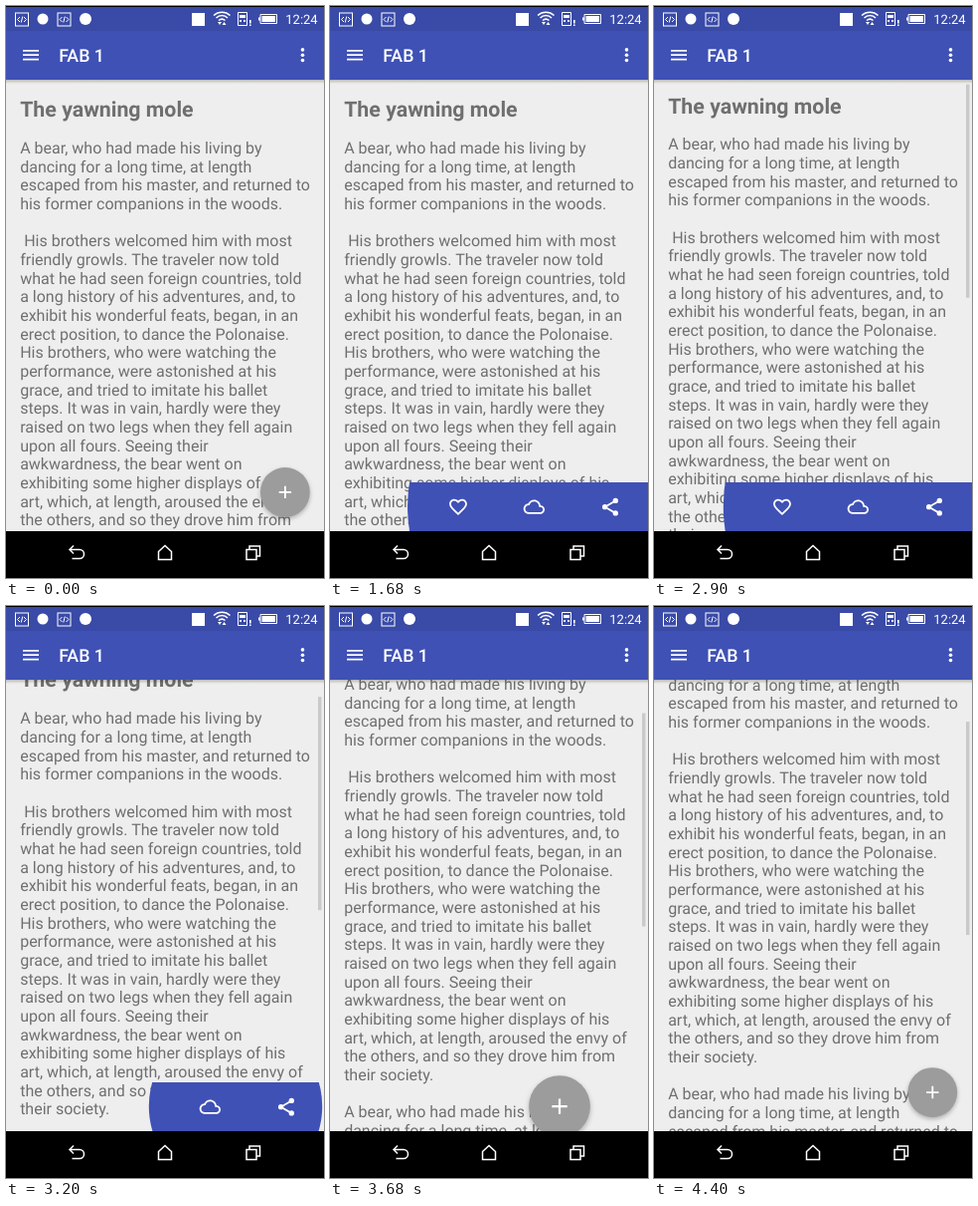
These frames come from a looping animation (320 px wide and 574 px high, 4.46 s). An HTML page:

```html
<!DOCTYPE html>
<html lang="en">
<meta charset="utf-8">
<title>FAB 1</title>
<style>
  html, body { margin: 0; height: 100%; overflow: hidden; background: #000; }
  svg { display: block; width: 100vw; height: 100vh; font-family: Roboto, sans-serif; text-rendering: geometricPrecision; }
  text { white-space: pre; }
  .line { fill: none; stroke: #fff; stroke-width: 1.5; }
  .thin { stroke-width: 1; }
  .bold { stroke-width: 1.8; }
  #fab { filter: drop-shadow(0 2px 2px #0004); }
</style>
<svg viewBox="0 0 320 574">
  <defs>
    <clipPath id="page"><rect y="74" width="320" height="453"/></clipPath>
    <clipPath id="reveal"><circle id="hole" cx="231" cy="502"/></clipPath>
    <linearGradient id="shade" x2="0" y2="1">
      <stop stop-opacity=".22"/><stop offset="1" stop-opacity="0"/>
    </linearGradient>
    <g id="code" class="line thin">
      <rect x="-6.5" y="-6.5" width="13" height="13"/>
      <path d="M-2-2.5-4.5 0-2 2.5M2-2.5 4.5 0 2 2.5M.7-3-.7 3"/>
    </g>
  </defs>

  <g clip-path="url(#page)">
    <rect y="74" width="320" height="453" fill="#eee"/>
    <g id="story" fill="#6f6f6f" font-size="16">
      <text x="14.2" y="111.2" font-size="21.33" font-weight="700">The yawning mole</text>
    </g>
    <rect id="thumb" x="314" width="3.5" height="214" fill="#c9c9c9"/>
    <rect y="74" width="320" height="4" fill="url(#shade)"/>
    <g id="bar" clip-path="url(#reveal)" fill="#fff">
      <rect y="478" width="320" height="49" fill="#3f51b5"/>
      <path transform="translate(118.3 492) scale(.889)" d="M16.5 3c-1.74 0-3.41.81-4.5 2.09C10.91 3.81 9.24 3 7.5 3 4.42 3 2 5.42 2 8.5c0 3.78 3.4 6.86 8.55 11.54L12 21.35l1.45-1.32C18.6 15.36 22 12.28 22 8.5 22 5.42 19.58 3 16.5 3zm-4.4 15.55l-.1.1-.1-.1C7.14 14.24 4 11.39 4 8.5 4 6.5 5.5 5 7.5 5c1.54 0 3.04.99 3.57 2.36h1.87C13.46 5.99 14.96 5 16.5 5c2 0 3.5 1.5 3.5 3.5 0 2.89-3.14 5.74-7.9 10.05z"/>
      <path transform="translate(194.7 492) scale(.889)" d="M19.35 10.04C18.67 6.59 15.64 4 12 4 9.11 4 6.6 5.64 5.35 8.04 2.34 8.36 0 10.91 0 14c0 3.31 2.69 6 6 6h13c2.76 0 5-2.24 5-5 0-2.64-2.05-4.78-4.65-4.96zM19 18H6c-2.21 0-4-1.79-4-4s1.79-4 4-4h.71C7.37 7.69 9.48 6 12 6c3.04 0 5.5 2.46 5.5 5.5v.5H19c1.66 0 3 1.34 3 3s-1.34 3-3 3z"/>
      <g transform="translate(271.3 492) scale(.889)">
        <path class="line" style="stroke-width:2" d="M18 5 6 12 18 19"/>
        <circle cx="18" cy="5" r="3"/><circle cx="6" cy="12" r="3"/><circle cx="18" cy="19" r="3"/>
      </g>
    </g>
    <g id="fab">
      <circle r="24.9" fill="#9c9c9c"/>
      <path class="line bold" d="M-6.2 0H6.2M0-6.2V6.2"/>
    </g>
  </g>

  <!-- status bar -->
  <rect y="1" width="320" height="24" fill="#394aa7"/>
  <use href="#code" x="16" y="13.5"/>
  <use href="#code" x="58.5" y="13.5"/>
  <g fill="#fff">
    <circle cx="37" cy="13" r="5.5"/>
    <circle cx="80" cy="13" r="6"/>
    <rect x="187" y="7" width="13" height="13"/>
    <path d="M235 9h6v3h-6zM235 14h2v2h-2zM239 14h2v2h-2zM245 14h1.6v3.5H245zM245 18.5h1.6V20H245z"/>
    <path d="M254 11.5h2v3h-2zM257.5 10H271v6H257.5z"/>
    <path d="M213 16l2 3 2-3zM217.5 19l2-3 2 3z"/>
    <text x="281.3" y="18" font-size="13">12:24</text>
  </g>
  <path class="line" d="M209 9.5a12 12 0 0 1 16.5 0M211.5 12a8 8 0 0 1 11.500 0M214 14.5a5 5 0 0 1 6.5 0"/>
  <path class="line thin" d="M233.500 6.500H242.500V19.500H233.500ZM256 8.500H272.500V17.500H256Z"/>

  <!-- app bar -->
  <rect y="25" width="320" height="49" fill="#3f51b5"/>
  <path class="line bold" d="M17 44.800H33M17 49.200H33M17 53.600H33"/>
  <g fill="#fff">
    <text x="53.200" y="56" font-size="17.8" font-weight="500">FAB 1</text>
    <circle cx="298.500" cy="43.900" r="1.8"/><circle cx="298.500" cy="49.200" r="1.8"/><circle cx="298.500" cy="54.500" r="1.8"/>
  </g>

  <!-- navigation bar -->
  <rect y="527" width="320" height="47"/>
  <path class="line" d="M64.500 545.500H74A4.500 4.500 0 0 1 74 554.500H66.500M68 541.500 64 545.500 68 549.500"/>
  <path class="line" d="M153.500 547.500 160 541.500 166.500 547.500V555.500H153.500Z"/>
  <path class="line" d="M242 545.500H252V555.500H242ZM245 545V542H255.500V552H252.500"/>
</svg>
<script>
const intro = `A bear, who had made his living by
dancing for a long time, at length
escaped from his master, and returned to
his former companions in the woods.`;
const lines = `${intro}

 His brothers welcomed him with most
friendly growls. The traveler now told
what he had seen foreign countries, told
a long history of his adventures, and, to
exhibit his wonderful feats, began, in an
erect position, to dance the Polonaise.
His brothers, who were watching the
performance, were astonished at his
grace, and tried to imitate his ballet
steps. It was in vain, hardly were they
raised on two legs when they fell again
upon all fours. Seeing their
awkwardness, the bear went on
exhibiting some higher displays of his
art, which, at length, aroused the envy of
the others, and so they drove him from
their society.

${intro}`.split('\n');

const $ = id => document.getElementById(id);
lines.forEach((line, i) => {
  const text = document.createElementNS('http://www.w3.org/2000/svg', 'text');
  text.setAttribute('x', 14.2);
  text.setAttribute('y', 148 + i * 18.667);
  text.textContent = line;
  $('story').append(text);
});

const LOOP = 4460, STEP = 60, HOLD = 2100, CLOSE = 2900;
const part = (t, from, to) => Math.min(1, Math.max(0, (t - from) / (to - from)));
const ease = (t, from, to) => (1 - Math.cos(Math.PI * part(t, from, to))) / 2;

// Time advances in fixed steps and pauses while the bar is open.
function stepTime(t) {
  const base = t < CLOSE ? 0 : CLOSE;
  const stepped = base + Math.floor((t - base) / STEP) * STEP;
  return base ? stepped : Math.min(HOLD, stepped);
}

function draw(t) {
  const closing = t >= CLOSE;
  const scroll = closing ? 82 * Math.sin(Math.PI / 2 * part(t, 2860, 4300)) : 0;
  // The invisible rotation keeps baselines from snapping to whole pixels.
  $('story').setAttribute('transform', `translate(0 ${-scroll}) rotate(.005)`);
  $('thumb').setAttribute('y', 77 + scroll * .477);
  $('thumb').style.display = closing ? '' : 'none';

  const barShown = t >= 1110 && t < 3666;
  $('bar').style.display = barShown ? '' : 'none';
  $('fab').style.display = barShown ? 'none' : '';
  const open = closing ? 1 - ease(t, 2237, 3666) : ease(t, 1110, 2220);
  $('hole').setAttribute('r', 31 + 234 * open);

  const moved = closing ? 1 - ease(t, 3670, 4455) : ease(t, 0, 1110);
  const scale = 1 + .24 * moved ** 1.5;
  $('fab').setAttribute('transform',
    `translate(${280.9 - 49.9 * moved} ${487.9 + 14.2 * moved}) scale(${scale})`);
}

const start = performance.now();
function tick() {
  draw(stepTime((performance.now() - start) % LOOP));
  requestAnimationFrame(tick);
}
tick();
</script>
</html>
```
